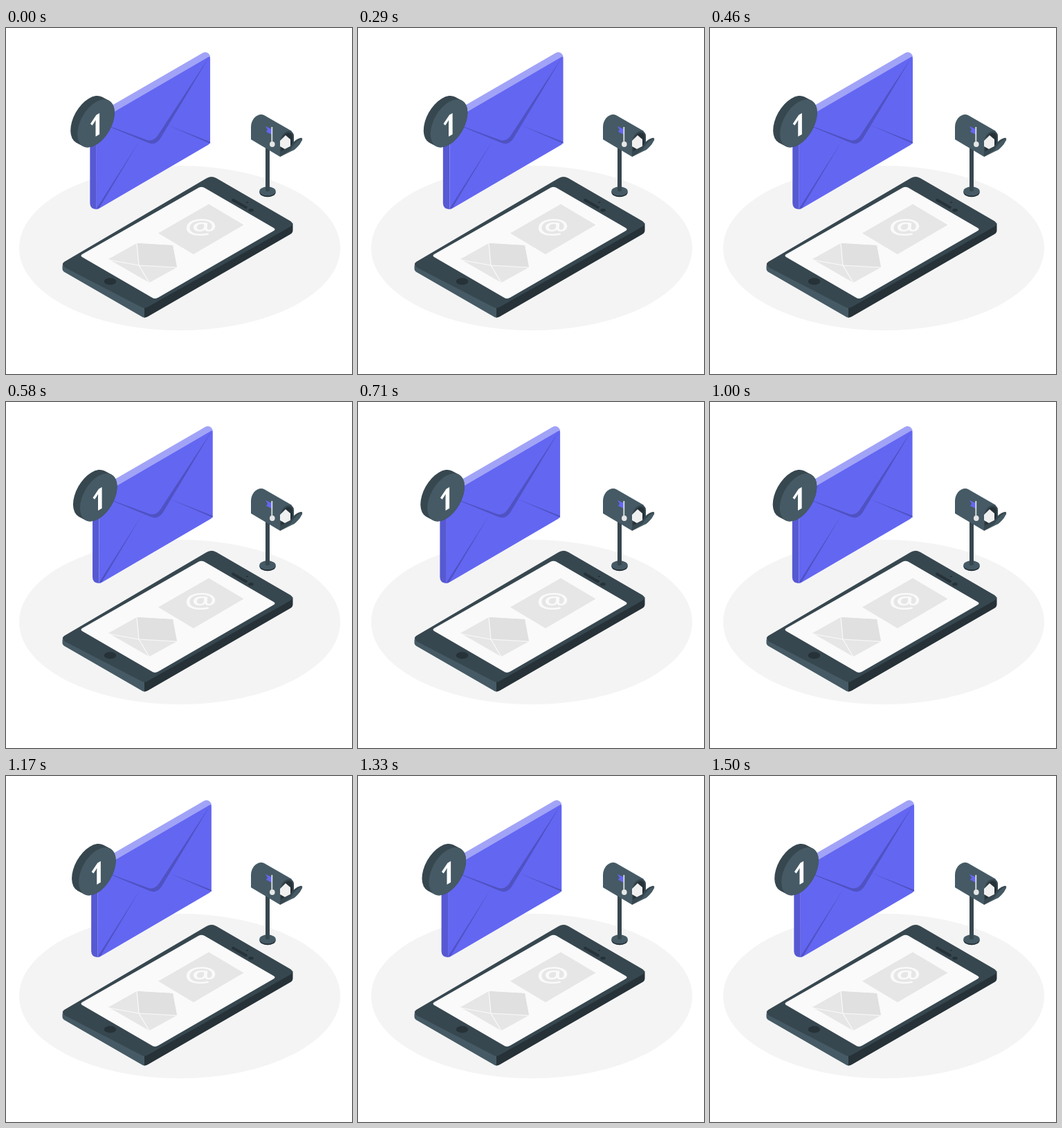
Animation of 500x500 px, one loop 1.54 s. Source, as an HTML page:

```html
<!DOCTYPE html>
<html lang="en">
<head>
<meta charset="utf-8">
<title>New mail</title>
<style>
  html, body { margin: 0; width: 100%; height: 100%; overflow: hidden; background: #fff; }
  svg { display: block; width: 100%; height: 100%; }
  text { font-family: "Open Sans", "Noto Sans", sans-serif; font-weight: 700; }
  .slate { fill: #455a64; }
  .dark { fill: #37474f; }
  .ink { fill: #263238; }
  .fold { fill: #4f52c1; }
</style>
</head>
<body>
<svg viewBox="0 0 500 500">
  <ellipse cx="251" cy="318" rx="232" ry="119" fill="#f4f4f4"/>

  <g id="mailbox">
    <ellipse class="ink" cx="378" cy="237.5" rx="11.7" ry="6.7"/>
    <ellipse class="slate" cx="378" cy="235.8" rx="11.7" ry="6.5"/>
    <path class="dark" d="M375 172H381V235Q378 237.5 375 235Z"/>
    <path class="slate" d="M354 161V143C354 133 361 125 369 125Q371 125 373 126L413 149L396 186Z"/>
    <path class="dark" d="M396 186V167C396 157 402 149 409 149Q416 149 416 157V174Z"/>
    <path class="ink" d="M397.500 182V167C398 158 403 151.500 409 151.500Q414 151.500 414 158V173Z"/>
    <path fill="#f0f0f0" d="M396 163L404 155L411 161V171L403 175L396 171Z"/>
    <path class="dark" d="M396 186V179L411 171Q417 161 425 159Q429 158 428 162Q422 174 412 178Z"/>
    <path class="slate" d="M396 186L411 176Q419 163 428 159.500Q428 164 418 175Q415 177 412 178Z"/>
    <path fill="#6366f1" d="M375 142L384 146V154L376 150L378 147Z"/>
    <path d="M384.300 143V166" stroke="#e0e0e0" stroke-width="1.800"/>
    <ellipse cx="384.800" cy="168" rx="3.800" ry="4" fill="#e6e6e6"/>
  </g>

  <g id="phone">
    <path class="slate" d="M81.500 343V348Q81.500 351 85 353L196 417Q198 418.500 201 418.500V404Z"/>
    <path class="ink" d="M200 404V418.500Q203 418 205 417L411 298Q414.500 296 414.500 292V282Z"/>
    <path class="dark" d="M84 338L290 217Q297 213 304 217L411 279Q417 283 411 287L205 403Q200 406 195 403L85 346Q79 342 84 338Z"/>
    <path fill="#fafafa" d="M110 327L278 231Q282.500 228.500 287 231L387 289Q390 291 387 293L220 389.500Q215 392.500 210 389L110 331Q107 329 110 327Z"/>
    <ellipse class="ink" cx="150.500" cy="366.300" rx="8.700" ry="5"/>
    <path d="M328 248.500L347 259.300" stroke="#263238" stroke-width="3.800" stroke-linecap="round"/>
    <ellipse class="ink" cx="348.500" cy="252" rx="1.700" ry="1.100"/>
    <ellipse class="ink" cx="354" cy="263.300" rx="3.800" ry="2.300"/>

    <path fill="#e6e6e6" d="M293 254.500L343.500 284.500L271 327L220 296.500Z"/>
    <text transform="matrix(1.220 0 0 .707 281.500 290)" x="0" y="11.500" font-size="43" text-anchor="middle" fill="#fafafa" style="font-weight:600">@</text>

    <path fill="#e6e6e6" d="M148 334L189 311L241 314L247 346L207 368Z"/>
    <path fill="#e0e0e0" d="M189 311L241 314L247 346L192 343Z"/>
    <path d="M148 335L192 343L247 346M189 311L192 343L207 368" fill="none" stroke="#fafafa" stroke-width="1.200"/>
  </g>

  <g id="mail">
    <path fill="#a1a3f7" d="M122 130L284 36.300Q289 33.500 293 37Q295.200 39 295.200 43L131 138Z"/>
    <path fill="#5659d2" d="M121.500 130L131 135V262Q121.500 261.500 121.500 253Z"/>
    <path fill="#6366f1" d="M131 136L292.500 42Q295.200 40.500 295.200 44V163Q295.200 167 292 169L137 259.500Q133 262 131 262Z"/>
    <path class="fold" d="M131 261L193 163L135 260Z"/>
    <path class="fold" d="M233 140L295.200 164.500V167Z"/>
    <path class="fold" d="M131 135L203 161.500Q212 165 219 156L294 41.500L223 160Q216 170 206 166Z"/>
    <g transform="matrix(.866 -.5 0 1 130.200 137.800)">
      <path d="M0 0L-11.500 -11" stroke="#37474f" stroke-width="62" stroke-linecap="round"/>
      <circle class="slate" r="31"/>
    </g>
    <text transform="matrix(.866 -.5 0 1 119.800 162.400)" font-size="43" fill="#fff">1</text>
  </g>
</svg>
<script>
  const LOOP = 1540, STEP = 1000 / 24, LEAD = 25, SHAKE = 1500;
  const stops = [0, -1, 2, -4, 4, -4, 4, -4, 2, -1, 0];
  const mail = document.getElementById("mail");

  // Linear shake through evenly spaced stops
  function shake(p) {
    const s = p * 10, i = Math.floor(s);
    return stops[i] + (stops[i + 1] - stops[i]) * (s - i);
  }

  function draw(now) {
    const t = now % LOOP;
    const tick = Math.min(36, Math.floor((t + 5) / STEP));
    const p = ((tick * STEP + LEAD) % SHAKE) / SHAKE;
    mail.setAttribute("transform", `translate(${shake(p).toFixed(3)} 0)`);
  }

  let start;
  function loop(now) {
    start ??= now;
    draw(now - start);
    requestAnimationFrame(loop);
  }
  draw(0);
  requestAnimationFrame(loop);
</script>
</body>
</html>
```
